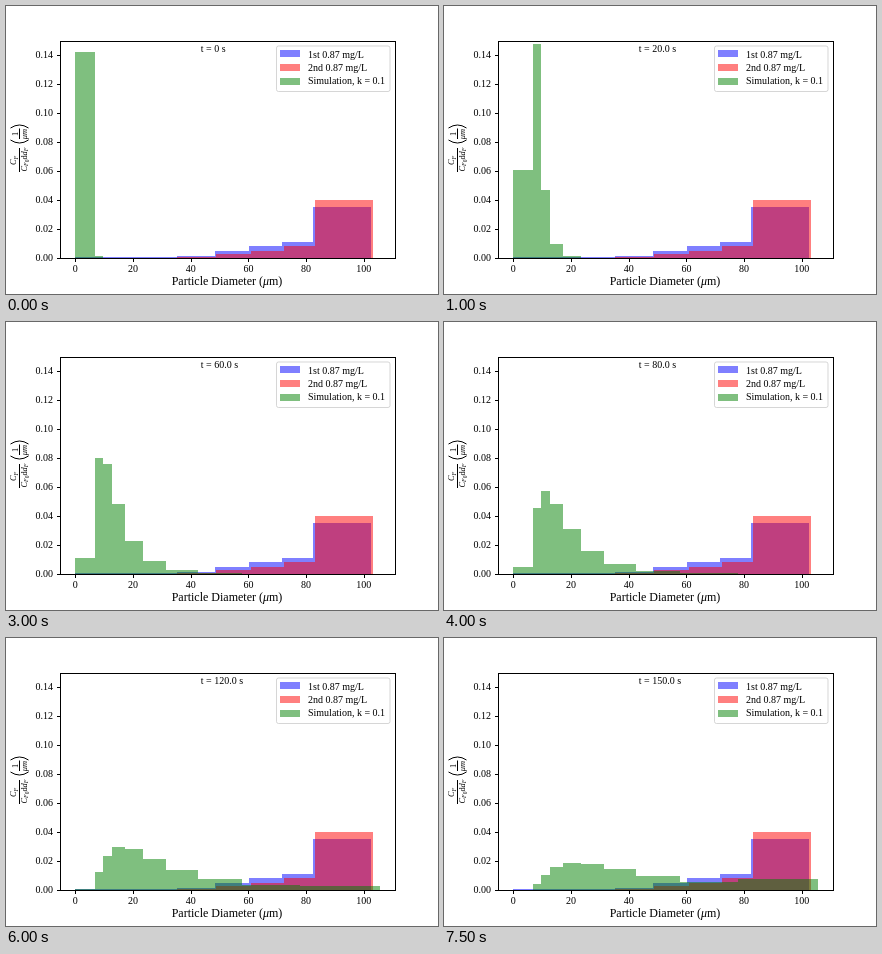
Write an HTML page that moves like this. It is 432x288 px and loops after 8 s.

```html
<!DOCTYPE html>
<html lang="en">
<head>
<meta charset="utf-8">
<title>Particle size histogram</title>
<style>
  html, body { margin: 0; width: 100%; height: 100%; overflow: hidden; background: #fff; }
  svg { display: block; font: 10px "Liberation Serif", "Times New Roman", serif; }
  .bars { shape-rendering: crispEdges; fill-opacity: .5; }
  .line { fill: none; stroke: #000; }
  .mid { text-anchor: middle; }
  .end { text-anchor: end; }
  .it { font-style: italic; }
  .math { font-size: 8.4px; }
  .sub { font-size: 5.9px; }
  .tiny { font-size: 5.4px; }
</style>
</head>
<body>
<svg width="432" height="288" viewBox="0 0 432 288">
  <g class="bars" id="measured"></g>
  <g class="bars" id="simulated" fill="#008000"></g>
  <g id="axes"><rect class="line" x="54.5" y="35.5" width="335" height="217"/></g>
  <text class="mid" x="221" y="279" font-size="12">Particle Diameter (<tspan class="it">μ</tspan>m)</text>

  <!-- rotated axis label: x runs up the page, y runs to the right -->
  <g class="math" transform="translate(0 166) rotate(-90)">
    <text x="7" y="10.2"><tspan class="it">C</tspan><tspan class="it sub" dy="1.5">F</tspan></text>
    <path class="line" d="M0 13.5H24M33 13.5H43.5"/>
    <text x=".5" y="20.5"><tspan class="it">C</tspan><tspan class="it sub" dy="1.5">F</tspan><tspan class="tiny" dy="1">0</tspan><tspan dy="-2.5">d</tspan><tspan class="it">d</tspan><tspan class="it sub" dy="1.5">F</tspan></text>
    <text class="mid" x="38" y="11.5">1</text>
    <text class="mid it" x="38" y="20.5">μm</text>
    <path class="line" d="M32 4.5Q26 13.5 32 22.5M44 4.5Q50 13.5 44 22.5"/>
  </g>

  <g id="legend">
    <rect x="270.5" y="40" width="113.5" height="45.5" rx="2" fill="#fff" fill-opacity=".8" stroke="#ccc" stroke-opacity=".8"/>
  </g>
  <text id="time" x="194.8" y="46"></text>
</svg>
<script>
const $ = id => document.getElementById(id);
const add = (parent, tag, attrs, text = '') => {
  const el = document.createElementNS('http://www.w3.org/2000/svg', tag);
  for (const key in attrs) el.setAttribute(key, attrs[key]);
  el.textContent = text;
  return parent.appendChild(el);
};

const BASE = 252, Y_SCALE = 1449.6, X_ZERO = 69.218, X_SCALE = 2.8863;
const px = x => Math.round(X_ZERO + x * X_SCALE);
const py = y => Math.round(BASE - y * Y_SCALE);

// Measured distributions, in pixels: left edges (plus the last right edge) and tops
const steps = (fill, edges, tops) => tops.forEach((y, i) =>
  add($('measured'), 'rect', { fill, x: edges[i], y, width: edges[i + 1] - edges[i], height: BASE - y }));
steps('#00f', [69, 171, 209, 243, 276, 307, 365], [251, 250, 245, 240, 236, 201]);
steps('#f00', [171, 210, 245, 278, 309, 367], [251, 248, 245, 240, 194]);

// Ticks
for (let v = 0; v <= 100; v += 20) {
  const x = X_ZERO + v * X_SCALE;
  add($('axes'), 'path', { class: 'line', d: `M${Math.round(x) + .5} 252.5v3.5` });
  add($('axes'), 'text', { class: 'mid', x, y: 266 }, v);
}
for (let i = 0; i < 8; i++) {
  const y = BASE - i * .02 * Y_SCALE;
  add($('axes'), 'path', { class: 'line', d: `M54.5 ${Math.round(y) + .5}h-3.5` });
  add($('axes'), 'text', { class: 'end', x: 47, y: y + 3.2 }, (i * .02).toFixed(2));
}

// Legend
[['#00f', '1st 0.87 mg/L'], ['#f00', '2nd 0.87 mg/L'], ['#008000', 'Simulation, k = 0.1']]
  .forEach(([fill, label], i) => {
    add($('legend'), 'rect', { fill, 'fill-opacity': .5, x: 274, y: 44 + 14 * i, width: 20, height: 7 });
    add($('legend'), 'text', { x: 302, y: 51.6 + 13.4 * i }, label);
  });

// Simulated sizes: each doubling of mass widens the diameter by 2^(1/2.3)
const BINS = 10, RATE = .0428;
const edges = [0];
for (let i = 0; i < BINS; i++) edges.push(7 * 2 ** (i / 2.3));
const bars = edges.slice(0, BINS).map((x, i) =>
  add($('simulated'), 'rect', { x: px(x), width: px(edges[i + 1]) - px(x) }));

// Mass moves up the bins as a Poisson process; the last bin keeps the rest
function draw(seconds) {
  const mean = RATE * (seconds + .08);
  let share = Math.exp(-mean), rest = 1;
  bars.forEach((bar, i) => {
    const mass = i < BINS - 1 ? share : rest;
    const top = py(mass / (edges[i + 1] - edges[i]));
    bar.setAttribute('y', top);
    bar.setAttribute('height', Math.max(0, BASE - top));
    rest -= share;
    share *= mean / (i + 1);
  });
  $('time').textContent = `t = ${seconds ? seconds.toFixed(1) : 0} s`;
}

const start = performance.now();
function frame() {
  draw(Math.floor((performance.now() - start) % 8000 / 500) * 10);
  requestAnimationFrame(frame);
}
frame();
</script>
</body>
</html>
```
